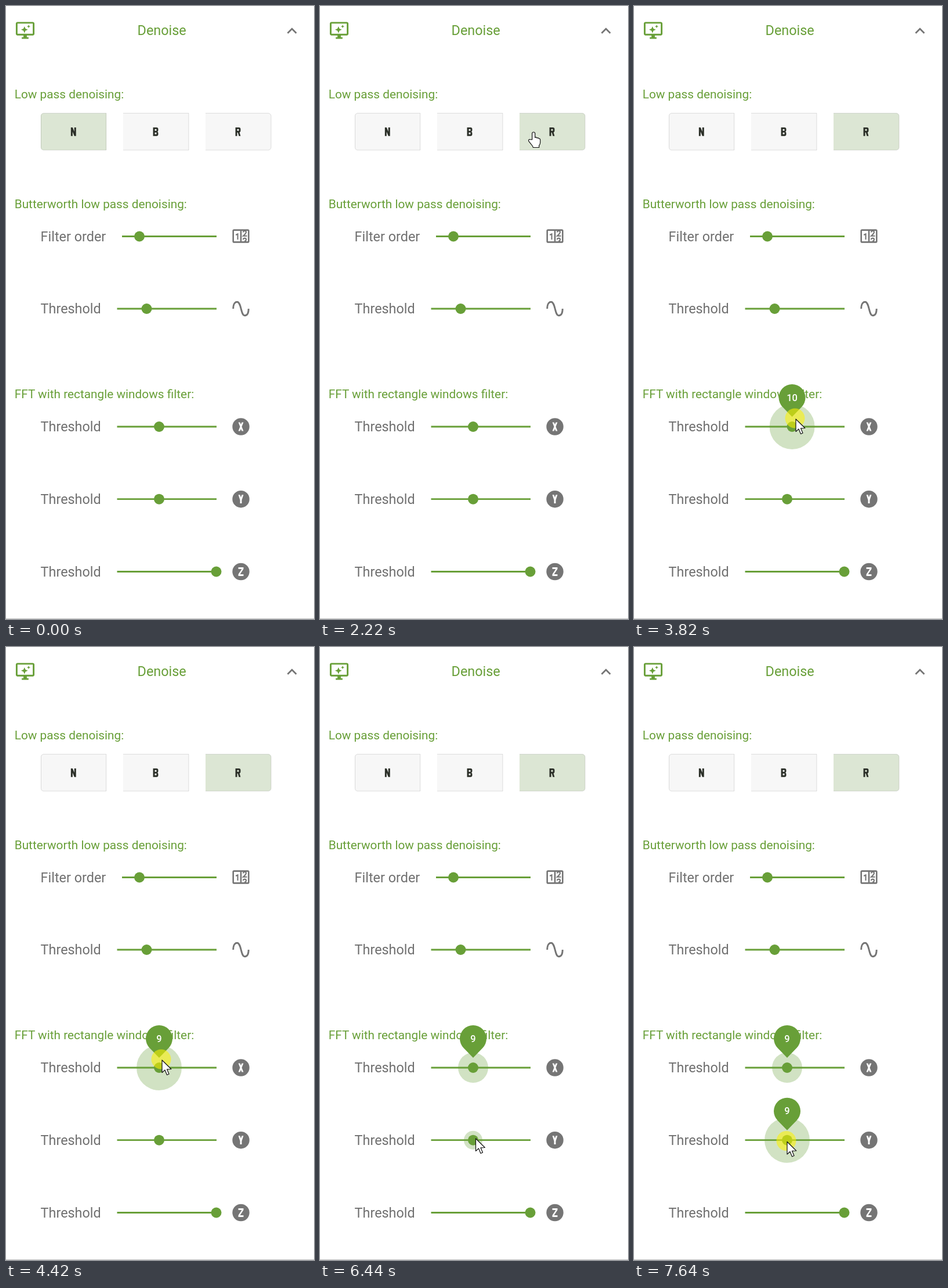
These frames come from a looping animation (531x1055 px, 8 s). An HTML page:

```html
<!DOCTYPE html>
<html lang="en">
<head>
<meta charset="utf-8">
<title>Denoise panel</title>
<style>
  html, body { margin: 0; width: 100%; height: 100%; overflow: hidden; background: #fff; }
  svg { display: block; width: 100vw; height: 100vh; }
  text { font-family: Roboto, sans-serif; }
  .title { font-size: 23.4px; fill: #689f38; text-anchor: middle; }
  .head { font-size: 20.8px; fill: #689f38; }
  .label { font-size: 23.4px; fill: #707070; }
  .green { fill: #689f38; }
  .track { stroke: #689f38; stroke-width: 2.8; }
  .ring { fill: #689f38; opacity: .3; }
  .pin text { font-size: 16.5px; font-weight: 500; fill: #fff; text-anchor: middle; }
  .icon { fill: #757575; }
  .line { fill: none; stroke: #757575; }
  .cursor { fill: #fff; stroke: #111; stroke-width: 1.2; stroke-linejoin: round; }
</style>
</head>
<body>
<svg id="stage" viewBox="0 0 531 1055" preserveAspectRatio="none">
  <defs><clipPath id="clipR"><path d="M344 184.500H452a5 5 0 0 1 5 5V243a5 5 0 0 1-5 5H344z"/></clipPath></defs>

  <g transform="translate(33 42) scale(1.46) translate(-12 -12)" class="green">
    <path fill-rule="evenodd" d="M21 16V4H3V16H21M21 2C22.100 2 23 2.900 23 4V16C23 17.100 22.100 18 21 18H14V20H16V22H8V20H10V18H3C1.900 18 1 17.100 1 16V4C1 2.900 1.900 2 3 2Z"/>
    <path id="star" d="M11.200 7.200l1.200 2.800 2.800 1.200-2.800 1.200-1.200 2.800-1.200-2.800-2.800-1.200 2.800-1.200z"/>
    <use href="#star" transform="translate(10.300 1.500) scale(.52)"/>
  </g>
  <text class="title" x="268.700" y="50.400">Denoise</text>
  <path class="line" stroke-width="2.700" d="M485.500 46.700L493 39.200L500.500 46.700"/>

  <text class="head" x="14.700" y="159">Low pass denoising:</text>
  <text class="head" x="14.700" y="347.500">Butterworth low pass denoising:</text>
  <text class="head" x="14.700" y="675">FFT with rectangle windows filter:</text>

  <g id="buttons"></g>
  <g id="sliders"></g>

  <g class="line" stroke-width="2.600" transform="translate(405 396)">
    <rect x="-13.300" y="-10.400" width="26.600" height="20.800" rx="1.500"/>
    <path d="M0-10V10"/>
    <path stroke-width="2.100" d="M-8.800-2L-5.500-3.600V6M4-6.500Q4-9 6.500-9T9-6.800Q9-5 4-.3H10.500M4 6Q4 3.600 6.500 3.600T9 6Q9 8.500 6 8.700"/>
  </g>
  <path class="line" stroke-width="2.900" d="M391.700 521C391.700 519 392 509.300 398.400 509.300C406 509.300 404.500 532.700 411.600 532.700C418.200 532.700 418.200 523 418.200 521"/>

  <path d="M0 1054.500H531" stroke="#bdbdbd"/>
  <g id="pins"></g>
  <circle id="spot" r="17" fill="#fff200" opacity=".56"/>
  <path id="arrow" class="cursor" d="M0 0V21.500L5 17L8.500 25.500L12 24L8.500 15.800L15.800 15.500Z"/>
  <path id="hand" class="cursor" d="M-2.800 13V2.500a2.500 2.500 0 0 1 5 0V9.500q2-1.500 3.300 .8q2-1 3.300 .8q2.400-.3 2.400 2.600v4.300q0 3-2 5v3.500H-1q-1-3-3.700-5.800l-4-5q-1-3.400 2.200-3z"/>
</svg>
<script>
const LOOP = 8000;
const $ = id => document.getElementById(id);

function add(parent, tag, attrs, text) {
  const el = document.createElementNS("http://www.w3.org/2000/svg", tag);
  set(el, attrs);
  if (text) el.textContent = text;
  return parent.appendChild(el);
}
function set(el, attrs) {
  for (const k in attrs) el.setAttribute(k, attrs[k]);
}
const show = (el, on) => { el.style.display = on ? "" : "none"; };

const glyphs = {
  N: "M9 7V17H11V12L13 17H15V7H13V12L11 7Z",
  B: "M15 10.5Q15 12 13.5 12Q15 12 15 13.5V15A2 2 0 0 1 13 17H9V7H13A2 2 0 0 1 15 9ZM13 15V13H11V15ZM13 11V9H11V11Z",
  R: "M9 7H13A2 2 0 0 1 15 9V11Q15 12.4 13.8 12.8L15 17H13L11.8 13H11V17H9ZM11 9V11H13V9Z",
  X: "M9 7L11 12L9 17H11L12 14.5L13 17H15L13 12L15 7H13L12 9.5L11 7Z",
  Y: "M9 7L11 13V17H13V13L15 7H13L12 10L11 7Z",
  Z: "M9 7V9H13L9 15V17H15V15H11L15 9V7Z"
};
function glyph(parent, name, x, y, fill) {
  add(parent, "path", {
    d: glyphs[name], fill, "fill-rule": "evenodd",
    transform: `translate(${x} ${y}) scale(1.48) translate(-12 -12)`
  });
}

// Toggle buttons
const shapes = {
  N: ["M65 184.500H173V248H65a5 5 0 0 1-5-5V189.500a5 5 0 0 1 5-5z", "M65 184.500H172.700V248H65a4.500 4.500 0 0 1-4.500-5V189.500a4.500 4.500 0 0 1 4.500-5z", 116.3],
  B: ["M202 184.500H315V248H202z", "M202 184.500H315V248H202", 258],
  R: ["M344 184.500H452a5 5 0 0 1 5 5V243a5 5 0 0 1-5 5H344z", "M344 184.500H452a5 5 0 0 1 5 5V243a5 5 0 0 1-5 5H344", 400]
};
const fills = {};
let ripple;
for (const name in shapes) {
  const [area, edge, x] = shapes[name];
  fills[name] = add($("buttons"), "path", { d: area });
  if (name === "R")
    ripple = add($("buttons"), "circle", { cx: 376, cy: 216, "clip-path": "url(#clipR)" });
  add($("buttons"), "path", { d: edge, fill: "none", stroke: "#000", "stroke-opacity": .12 });
  glyph($("buttons"), name, x, 216.3, "#2b2f28");
}

// Sliders
function slider(label, y, left, thumbX, badge) {
  const g = add($("sliders"), "g", { transform: `translate(0 ${y})` });
  add(g, "text", { class: "label", x: 59.6, y: 8 }, label);
  add(g, "path", { class: "track", d: `M${left} 0H363` });
  const ring = add(g, "circle", { class: "ring", cx: thumbX, r: 0 });
  const thumb = add(g, "circle", { class: "green", cx: thumbX, r: 9 });
  if (badge) {
    add(g, "circle", { class: "icon", cx: 405, r: 14.7 });
    glyph(g, badge, 405, 0, "#fff");
  }
  const pin = add($("pins"), "g", { class: "pin" });
  add(pin, "path", { class: "green", d: "M0-17L-16.260-33.740A23 23 0 1 1 16.260-33.740Z" });
  const num = add(pin, "text", { y: -44.3 });
  return (value, r, size) => {
    const x = 264 + 8.57 * (value - 9);
    set(ring, { cx: x, r });
    set(thumb, { cx: x });
    show(pin, size > 0);
    set(pin, { transform: `translate(${x} ${y}) scale(${size})` });
    num.textContent = value;
  };
}
slider("Filter order", 396.5, 200, 230);
slider("Threshold", 521, 191.5, 242.5);
const moveX = slider("Threshold", 724, 191.5, 264, "X");
const moveY = slider("Threshold", 848.7, 191.5, 264, "Y");
slider("Threshold", 973.5, 191.5, 362.5, "Z");
document.querySelectorAll(".pin").forEach(p => show(p, false));

// Each step lists only what changes: at = pointer, x/y = slider state
const start = {
  at: null, hand: false, press: false, pick: "N", ripple: 0,
  xv: 9, xr: 0, xp: 0, yv: 9, yr: 0, yp: 0
};
const steps = [
  [0, {}],
  [400, { at: [449, 886] }],
  [600, { at: [405, 770] }],
  [800, { at: [335, 610] }],
  [1000, { at: [263, 420] }],
  [1200, { at: [318, 268] }],
  [1400, { at: [376, 210], hand: true }],
  [1800, { at: [368.5, 217], ripple: 31.5 }],
  [2000, { pick: "R", ripple: 82 }],
  [2200, { ripple: 0 }],
  [2400, { at: [345, 310], hand: false }],
  [2600, { at: [305, 510] }],
  [2820, { at: [276, 692] }],
  [3030, { at: [272, 711], xr: 16 }],
  [3220, { at: [270, 711], press: true, xr: 26 }],
  [3430, { xr: 37, xp: .9 }],
  [3620, { xr: 39, xp: 1 }],
  [3820, { at: [279, 711], xv: 10 }],
  [4020, { at: [281, 711] }],
  [4220, { at: [288, 711], xv: 11 }],
  [4420, { at: [269, 711], xv: 9 }],
  [4610, { at: [267, 711] }],
  [5020, { at: [328, 711], xv: 16 }],
  [5220, { at: [263, 711], xv: 8 }],
  [5620, { at: [266, 711.5] }],
  [5820, { at: [268, 712], xv: 9 }],
  [6030, { at: [269, 714], press: false, xr: 26 }],
  [6240, { at: [271, 780] }],
  [6440, { at: [268.5, 846], yr: 16 }],
  [6640, { at: [269, 852], yr: 26 }],
  [6840, { at: [266, 852], press: true }],
  [7040, { yr: 39, yp: 1 }],
  [7240, { at: [274, 852], yv: 10 }],
  [7440, { at: [276, 852] }],
  [7640, { at: [264, 851.5], yv: 9 }]
];
let last = start;
const states = steps.map(([t, change]) => [t, last = { ...last, ...change }]);

function render(s) {
  const [x, y] = s.at || [0, 0];
  show($("arrow"), s.at && !s.hand);
  show($("hand"), s.at && s.hand);
  show($("spot"), s.press);
  for (const id of ["arrow", "hand"]) set($(id), { transform: `translate(${x} ${y})` });
  set($("spot"), { cx: x - 1.5, cy: y - 1.5 });
  for (const name in fills)
    set(fills[name], { fill: name === s.pick ? "#dce6d4" : "#f7f7f7" });
  if (s.ripple && s.pick === "N") set(fills.R, { fill: "#e0e0e0" });
  set(ripple, { r: s.ripple, opacity: s.pick === "N" ? .15 : .06 });
  moveX(s.xv, s.xr, s.xp);
  moveY(s.yv, s.yr, s.yp);
}

const origin = performance.now();
let current;
function tick() {
  const t = (performance.now() - origin) % LOOP;
  let now = states[0][1];
  for (const [at, s] of states) if (at <= t) now = s;
  if (now !== current) render(current = now);
  requestAnimationFrame(tick);
}
tick();
</script>
</body>
</html>
```
